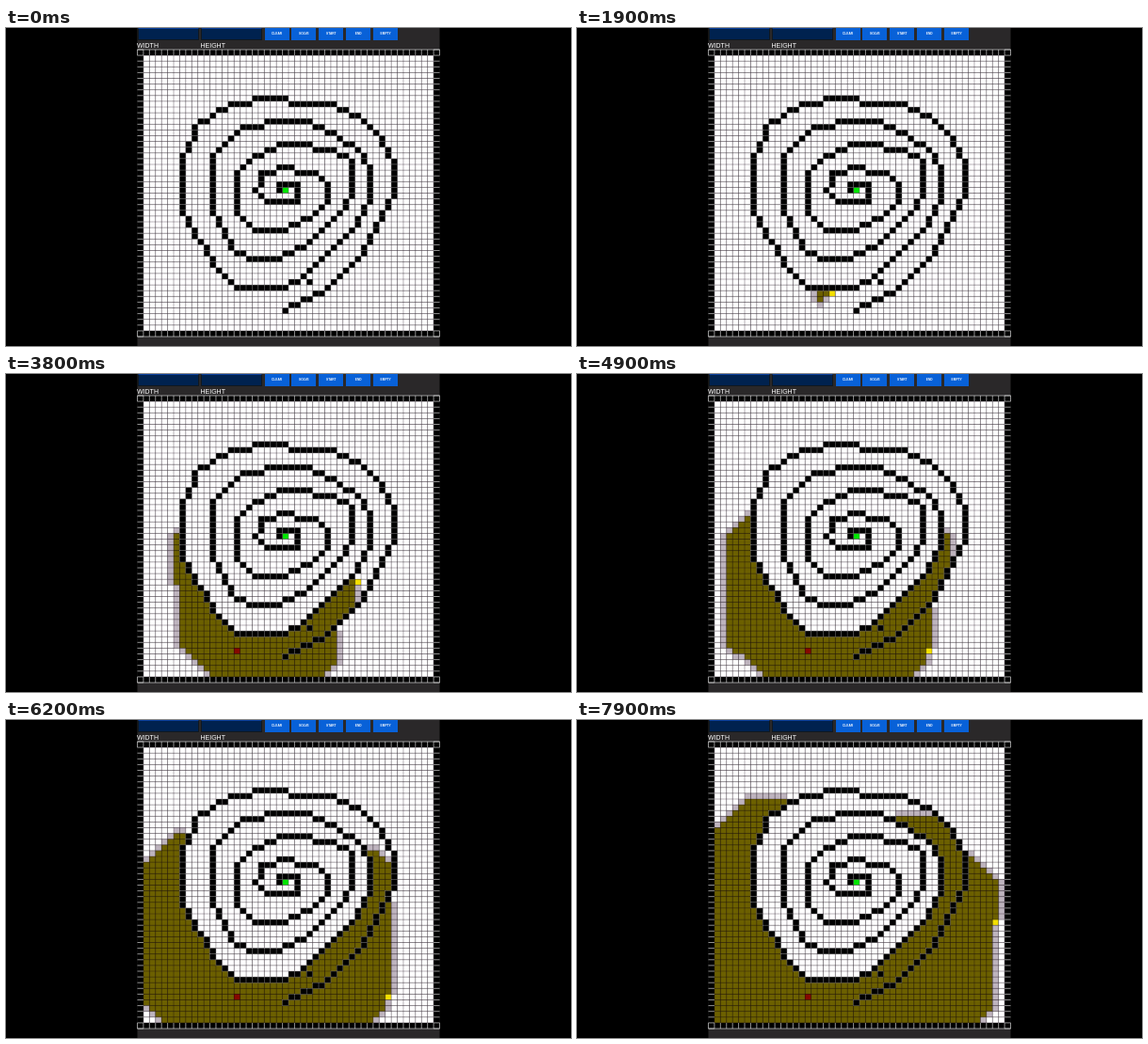
Write an HTML page with a canvas that moves like this. It is 600 px wide and 338 px high and loops after 8000 ms.

```html
<!DOCTYPE html>
<html lang="en">
<head>
<meta charset="utf-8">
<title>Grid path search</title>
<style>
  html, body { margin: 0; width: 100%; height: 100%; overflow: hidden; background: #000; }
  #stage { position: relative; width: 600px; height: 338px; overflow: hidden; font-family: "Liberation Sans", Arial, sans-serif; }
  canvas { position: absolute; left: 0; top: 0; }
  .label, .btn, .field { position: absolute; box-sizing: border-box; white-space: nowrap; }
  .label { top: 14.5px; font-size: 7px; line-height: 8px; color: #fff; }
  .field { top: 0; width: 65px; height: 13px; background: #00224f; border: 1px solid #10181f; border-top-color: #0b3f9c; }
  .btn { top: -1px; width: 26px; height: 14px; background: #0861d8; color: #fff; font-size: 3.2px; font-weight: bold; line-height: 15px; text-align: center; }
</style>
</head>
<body>
<div id="stage">
  <canvas id="view" width="600" height="338"></canvas>
  <div class="field" style="left:139.5px"></div>
  <div class="field" style="left:206.5px"></div>
  <div class="label" style="left:139px">WIDTH</div>
  <div class="label" style="left:206.5px">HEIGHT</div>
</div>
<script>
const stage = document.getElementById('stage');
const ctx = document.getElementById('view').getContext('2d');
const N = 50, LEFT = 139.5, TOP = 23, CW = 6.42, CH = 6.1;
const LOOP = 8000, TICK = 100;
const at = (x, y) => y * N + x;
const START = at(18, 43), GOAL = at(24, 24), MARK = at(16, 44);

['CLEAR', 'SOLVE', 'START', 'END', 'EMPTY'].forEach((text, i) => {
  const btn = document.createElement('div');
  btn.className = 'btn';
  btn.textContent = text;
  btn.style.left = 274.5 + i * 28.9 + 'px';
  stage.append(btn);
});

const wall = new Uint8Array(N * N);
const nearest = v => Math.ceil(v - 0.5 - 1e-9);

// Marks the cells under a polyline of x, y pairs.
function trace(...p) {
  for (let i = 0; i + 3 < p.length; i += 2) {
    const dx = p[i + 2] - p[i], dy = p[i + 3] - p[i + 1];
    const n = Math.max(Math.abs(dx), Math.abs(dy));
    for (let k = 0; k <= n; k++) {
      wall[at(nearest(p[i] + dx * k / n), nearest(p[i + 1] + dy * k / n))] = 1;
    }
  }
}

trace(0, 0, N - 1, 0, N - 1, N - 1, 0, N - 1, 0, 0);
// Bends of the spiral, one turn per call, from the tail inwards
trace(24,45, 30,42, 36,36, 42,25, 42,19, 40,15, 37,12, 32,9, 25,9, 24,8, 19,8, 18,9, 15,9,
  9,13, 9,15, 7,19, 7,27, 10,33, 13,38, 16,41, 24,41);
trace(24,41, 26,40, 36,30, 38,25, 38,20, 36,17, 28,12, 21,12, 20,13, 17,13, 12,18, 12,28,
  16,35, 18,36, 23,36);
trace(23,36, 27,34, 33,28, 35,25, 35,19, 32,17, 29,17, 28,16, 23,16, 22,17, 19,18, 16,21,
  16,28, 19,31, 23,31);
trace(23,31, 28,29, 31,26, 31,23, 29,21, 26,21, 25,20, 23,20, 22,21, 20,21, 20,23, 19,24,
  21,26, 26,26, 26,23, 23,23, 23,24);
wall[at(28, 40)] = 1;

// A* on four neighbours; equal scores go to the topmost, then leftmost cell.
const NEVER = 1e9;
const opened = new Int32Array(N * N).fill(NEVER);
const visited = new Int32Array(N * N).fill(NEVER);

function search() {
  const g = new Float64Array(N * N).fill(Infinity);
  const score = c => g[c] + Math.abs(c % N - GOAL % N) + Math.abs((c / N | 0) - (GOAL / N | 0));
  const open = new Set([START]);
  g[START] = 0;
  for (let step = 0; open.size; step++) {
    let best = -1;
    for (const c of open) {
      const gain = best < 0 ? 1 : score(best) - score(c);
      if (gain > 0 || (gain === 0 && c < best)) best = c;
    }
    if (best === GOAL) return;
    open.delete(best);
    visited[best] = step;
    for (const next of [best - N, best + 1, best + N, best - 1]) {
      if (wall[next] || visited[next] < NEVER) continue;
      if (!open.has(next)) {
        open.add(next);
        opened[next] = step;
      }
      g[next] = Math.min(g[next], g[best] + 1);
    }
  }
}
search();

// Cells being expanded at given times set the pace.
const pace = [[1900, 20, 42], [2800, 11, 40], [3800, 36, 32], [4900, 36, 44], [6200, 41, 44], [7900, 47, 31]]
  .map(([t, x, y]) => [t, visited[at(x, y)]])
  .filter(([, step]) => step < NEVER);

function stepAt(t) {
  if (t < pace[0][0]) return -1;
  const i = Math.max(1, pace.findIndex(([end]) => t <= end));
  const [t0, s0] = pace[i - 1], [t1, s1] = pace[i];
  return Math.round(s0 + (s1 - s0) * (t - t0) / (t1 - t0));
}

function cellColor(c, step) {
  if (wall[c]) return '#000';
  if (c === GOAL) return '#00e600';
  if (visited[c] === step) return '#f4e000';
  if (visited[c] < step) return c === MARK ? '#860800' : '#6c6000';
  if (opened[c] < step) return '#beb4be';
  return '#fff';
}

function lines(color, width, addLines) {
  ctx.strokeStyle = color;
  ctx.lineWidth = width;
  ctx.beginPath();
  addLines((x1, y1, x2, y2) => {
    ctx.moveTo(LEFT + x1 * CW, TOP + y1 * CH);
    ctx.lineTo(LEFT + x2 * CW, TOP + y2 * CH);
  });
  ctx.stroke();
}

function draw(t) {
  const step = stepAt(t);
  ctx.fillStyle = '#000';
  ctx.fillRect(0, 0, 600, 338);
  ctx.fillStyle = '#2a2829';
  ctx.fillRect(LEFT, 0, N * CW, 338);

  const box = c => [LEFT + c % N * CW, TOP + (c / N | 0) * CH, CW, CH];
  ctx.fillStyle = '#000';
  ctx.fillRect(LEFT, TOP, N * CW, N * CH);
  for (let c = 0; c < N * N; c++) {
    ctx.fillStyle = cellColor(c, step);
    if (!wall[c]) ctx.fillRect(...box(c));
  }

  lines('rgba(20,0,20,0.55)', 0.55, line => {
    for (let i = 1; i < N; i++) {
      line(i, 1, i, N - 1);
      line(1, i, N - 1, i);
    }
  });
  // Ticks across the border
  lines('#d0d0d0', 0.7, line => {
    for (let i = 0; i <= N; i++) {
      for (const side of [0, N - 1]) {
        line(i, side, i, side + 1);
        line(side, i, side + 1, i);
      }
    }
    line(0, 0, N, 0);
    line(0, N, N, N);
  });

  ctx.fillStyle = '#000';
  ctx.strokeStyle = 'rgba(255,255,255,0.4)';
  ctx.lineWidth = 0.5;
  for (let c = 0; c < N * N; c++) {
    const x = c % N, y = c / N | 0;
    if (!wall[c] || x % (N - 1) === 0 || y % (N - 1) === 0) continue;
    ctx.fillRect(...box(c));
    ctx.strokeRect(...box(c));
  }
}

let shown = -1;
function frame() {
  const t = Math.floor(performance.now() % LOOP / TICK) * TICK;
  if (t !== shown) draw(shown = t);
  requestAnimationFrame(frame);
}
draw(0);
requestAnimationFrame(frame);
</script>
</body>
</html>
```
